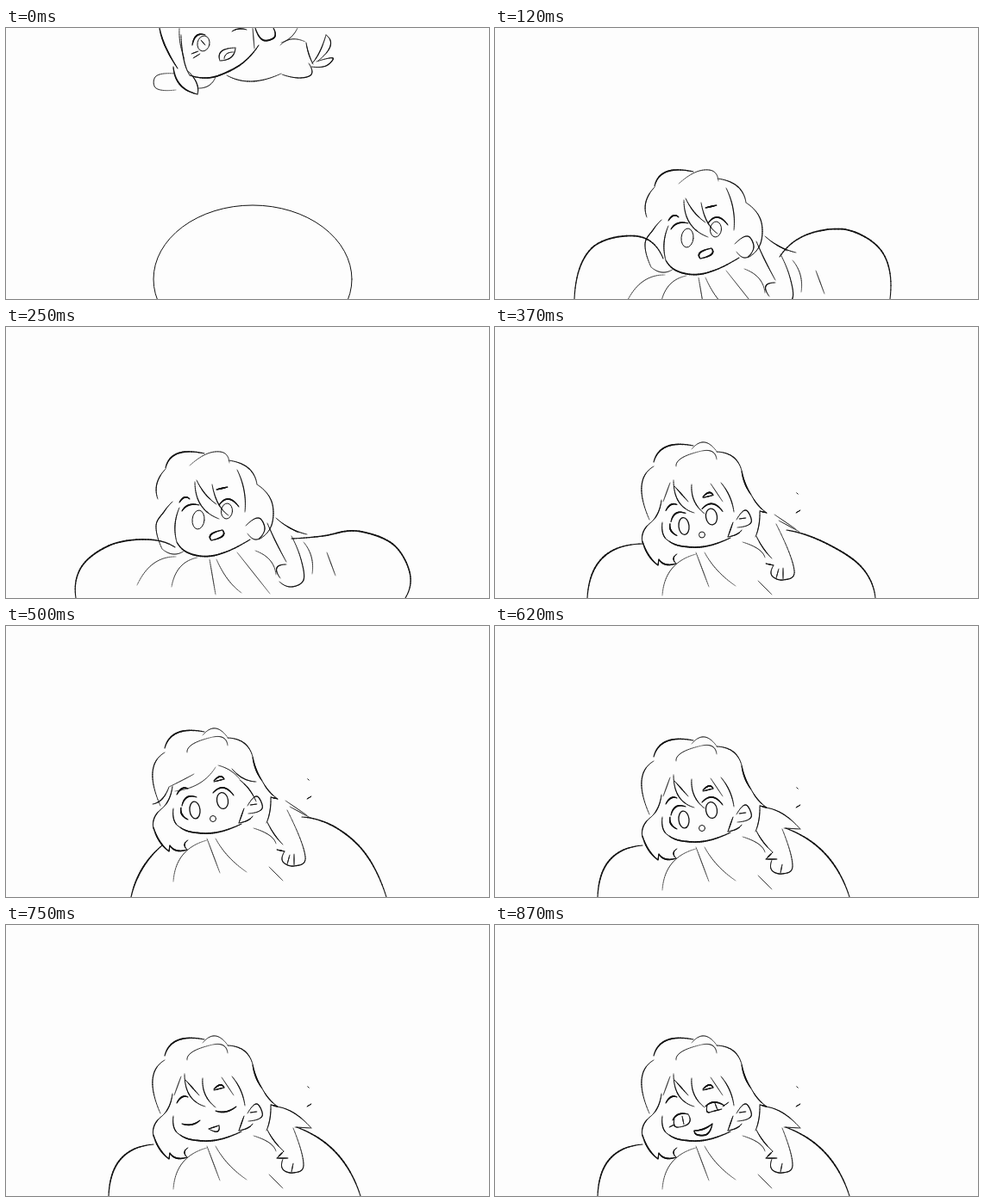
Recreate the animation shown at these times as an HTML page with a canvas. Size 560 px wide and 315 px high, loop 1000 ms.

```html
<!DOCTYPE html>
<html lang="en">
<head>
<meta charset="utf-8">
<title>Bouncy landing</title>
<style>
html, body { margin: 0; width: 100%; height: 100%; overflow: hidden; background: #fdfdfd; }
canvas { display: block; width: 100vw; height: 100vh; }
</style>
</head>
<body>
<canvas id="stage"></canvas>
<script>
const W = 560, H = 315, LOOP = 1000;
const stage = document.getElementById('stage');
const scale = window.devicePixelRatio || 1;
stage.width = W * scale;
stage.height = H * scale;
const ctx = stage.getContext('2d');

const phantom = (a, b, c) => 3 * a - 3 * b + c;

// Smooth tapered stroke through the given points.
function curve(width, p) {
  const pts = [];
  for (let i = 0; i < p.length; i += 2) pts.push({ x: p[i], y: p[i + 1] });
  const n = pts.length - 1;
  const mid = { x: (pts[0].x + pts[n].x) / 2, y: (pts[0].y + pts[n].y) / 2 };
  if (n === 1) return curve(width, [pts[0].x, pts[0].y, mid.x, mid.y, pts[1].x, pts[1].y]);
  const end = (a, b, c) => ({ x: phantom(a.x, b.x, c.x), y: phantom(a.y, b.y, c.y) });
  const all = [end(pts[0], pts[1], pts[2]), ...pts, end(pts[n], pts[n - 1], pts[n - 2])];
  const at = (i, t, k) => {
    const [a, b, c, d] = [0, 1, 2, 3].map(j => all[i + j][k]);
    return b + t / 2 * (c - a + t * (2 * a - 5 * b + 4 * c - d + t * (3 * (b - c) + d - a)));
  };
  const steps = n * 12;
  let x = pts[0].x, y = pts[0].y;
  for (let s = 1; s <= steps; s++) {
    const i = Math.min(n - 1, Math.floor(s / 12)), t = s / 12 - i;
    ctx.lineWidth = width * (.6 + .4 * Math.sin(Math.PI * s / steps));
    ctx.beginPath();
    ctx.moveTo(x, y);
    ctx.lineTo(x = at(i, t, 'x'), y = at(i, t, 'y'));
    ctx.stroke();
  }
}

const thin = (...p) => curve(.75, p);
const mid = (...p) => curve(1.15, p);
const bold = (...p) => curve(1.75, p);

function oval(x, y, rx, ry, tilt = 0, width = 1) {
  ctx.lineWidth = width;
  ctx.beginPath();
  ctx.ellipse(x, y, rx, ry, tilt, 0, 2 * Math.PI);
  ctx.stroke();
}

function shifted(dy, draw) {
  ctx.save();
  ctx.translate(0, dy);
  draw();
  ctx.restore();
}

function falling() {
  bold(178, 0, 185, 22, 199, 47);
  bold(194, 45, 202, 66, 222, 77);
  mid(222, 77, 221, 64, 211, 50);
  mid(203, 8, 206, 36, 213, 55);
  bold(213, 55, 232, 58, 250, 54, 274, 41, 293, 20);
  bold(289, 0, 298, 14, 311, 11, 310, 0);
  thin(196, 53, 174, 56, 174, 70, 197, 72);
  thin(222, 70, 235, 67, 243, 57);
  thin(201, 0, 202, 18, 207, 36);
  oval(229, 18, 7, 9, .2);
  bold(216, 20, 221, 9, 231, 8);
  thin(226, 14, 231, 20);
  thin(215, 30, 223, 27);
  thin(217, 35, 225, 30);
  mid(248, 38, 250, 27, 266, 23);
  mid(266, 23, 261, 34, 248, 38);
  thin(253, 36, 256, 30, 264, 28);
  mid(262, 4, 270, 1, 279, 2);
  thin(286, 0, 288, 24);
  mid(256, 55, 285, 62, 319, 53);
  mid(320, 54, 340, 58, 354, 54, 351, 41);
  mid(348, 17, 351, 30, 356, 42);
  mid(354, 45, 371, 44, 379, 35, 360, 39);
  mid(355, 41, 364, 27, 371, 8);
  mid(371, 8, 376, 21, 362, 38);
  thin(338, 0, 330, 11, 319, 17);
  thin(318, 20, 331, 13, 347, 16);
}

function landedHead() {
  bold(185, 164, 199, 147, 230, 147);
  thin(213, 161, 234, 147, 252, 146, 259, 158);
  mid(258, 155, 281, 164, 291, 183);
  mid(291, 183, 308, 203, 308, 230, 293, 247);
  mid(185, 165, 175, 182, 176, 200);
  mid(193, 203, 183, 215, 174, 231, 181, 258);
  thin(181, 258, 194, 264, 207, 260);
  mid(201, 210, 196, 230, 198, 250);
  bold(198, 250, 215, 264, 244, 265, 283, 247);
  mid(219, 180, 226, 207, 247, 223);
  mid(221, 178, 231, 194, 244, 206);
  mid(239, 183, 246, 205, 258, 219);
  mid(268, 166, 276, 190, 277, 215);
  mid(278, 231, 293, 222, 300, 234, 293, 246);
  thin(280, 240, 289, 247, 298, 242);
  oval(223, 224, 7, 11, .1);
  oval(256, 214, 6.5, 9, .1);
  bold(204, 214, 212, 207, 224, 207);
  bold(247, 207, 258, 200, 270, 209);
  bold(201, 204, 207, 198, 213, 200);
  bold(244, 189, 257, 186);
  bold(238, 248, 238, 241, 251, 236);
  bold(251, 236, 251, 243, 238, 248);
}

function landedBody() {
  thin(152, 300, 171, 275, 197, 267);
  thin(192, 302, 202, 279, 222, 268);
  thin(236, 270, 243, 311);
  thin(244, 270, 257, 293, 273, 309);
  thin(268, 262, 306, 310);
  thin(289, 260, 306, 271, 313, 288);
  thin(345, 250, 354, 267, 355, 287);
  thin(372, 262, 382, 289);
  mid(303, 228, 313, 250, 325, 273);
  mid(325, 276, 314, 280, 318, 292);
  mid(317, 296, 331, 302, 345, 294, 342, 270, 331, 243);
  mid(313, 222, 330, 234, 349, 241);
  thin(326, 232, 339, 239);
}

function landed() {
  landedHead();
  landedBody();
}

function head() {
  bold(184, 152, 199, 134, 230, 133);
  thin(210, 157, 217, 147, 240, 139);
  thin(240, 139, 252, 140, 257, 149);
  thin(228, 137, 243, 129, 258, 141);
  mid(257, 140, 276, 146, 286, 162);
  bold(286, 162, 290, 177, 297, 190);
  mid(297, 190, 305, 202, 315, 211);
  mid(315, 211, 307, 209);
  mid(307, 209, 306, 225, 302, 239);
  mid(184, 157, 170, 180, 179, 219);
  mid(193, 196, 189, 211, 181, 222);
  mid(181, 222, 172, 233, 171, 246);
  bold(171, 244, 178, 260, 189, 272);
  mid(189, 272, 190, 265);
  bold(190, 265, 198, 271, 210, 270);
  mid(210, 270, 207, 264, 211, 259);
  mid(194, 222, 195, 236, 202, 244);
  bold(202, 244, 218, 250, 244, 250, 273, 240);
  mid(280, 219, 291, 208, 297, 222, 281, 228);
  thin(283, 218, 291, 217);
  mid(276, 222, 270, 239);
  mid(270, 239, 280, 236, 286, 231);
}

function bangs() {
  mid(207, 173, 213, 198, 231, 211);
  mid(208, 180, 224, 198);
  mid(228, 178, 231, 197, 243, 212);
  mid(262, 176, 272, 192, 277, 210);
  thin(203, 176, 195, 198);
  thin(250, 177, 264, 198);
}

function sweptBangs() {
  mid(170, 217, 181, 211, 189, 197);
  thin(189, 197, 205, 189, 218, 182);
  thin(196, 202, 224, 193, 243, 174);
  thin(246, 172, 260, 178, 271, 188);
  mid(262, 176, 275, 187, 290, 191);
  mid(271, 189, 282, 200, 290, 214);
}

function brows() {
  bold(198, 207, 204, 200, 211, 200);
  bold(241, 191, 248, 186, 253, 189);
  mid(253, 189, 241, 192);
}

function openFace() {
  oval(219, 225, 6, 10, -.1, 1.3);
  oval(251, 214, 6.5, 9.5, -.15, 1.3);
  oval(240, 235, 3.5, 3.5);
  bold(204, 220, 210, 210, 221, 210);
  bold(240, 205, 252, 199, 264, 208);
  bold(203, 222, 204, 230, 211, 236);
}

function blinkFace() {
  bold(204, 231, 215, 232, 225, 227);
  bold(243, 216, 255, 217, 267, 211);
  mid(235, 237, 247, 233);
  mid(247, 233, 245, 240, 235, 237);
}

function smileFace() {
  bold(206, 227, 213, 220, 224, 220);
  mid(208, 225, 208, 233, 213, 235);
  mid(213, 235, 225, 230, 224, 220);
  thin(217, 222, 219, 232);
  bold(244, 211, 254, 206, 266, 210);
  mid(246, 210, 246, 217, 251, 217);
  mid(251, 217, 263, 214);
  thin(255, 207, 258, 215);
  thin(202, 235, 208, 232);
  thin(264, 211, 271, 206);
  bold(231, 239, 242, 237, 252, 231);
  bold(252, 231, 246, 243, 235, 244, 231, 239);
}

function body() {
  thin(194, 307, 205, 276, 233, 259);
  thin(233, 257, 248, 297);
  thin(243, 257, 258, 278, 279, 296);
  thin(287, 245, 305, 253, 313, 263);
  thin(305, 290, 321, 306);
  thin(350, 188, 351, 189);
  thin(349, 211, 354, 208);
}

function spreadArm() {
  mid(303, 238, 311, 251, 322, 263);
  mid(322, 263, 314, 271);
  mid(314, 271, 327, 271);
  mid(321, 272, 321, 284, 333, 288, 345, 279, 333, 236);
  thin(331, 287, 333, 277);
  mid(312, 211, 333, 218, 354, 236);
  thin(354, 236, 335, 235);
}

function foldedArm() {
  mid(303, 238, 311, 252, 321, 264);
  mid(314, 270, 323, 272);
  mid(323, 272, 321, 284, 334, 289, 347, 278, 326, 224);
  thin(326, 287, 329, 276);
  thin(334, 288, 334, 275);
  thin(324, 213, 349, 230);
  thin(329, 220, 353, 233);
}

const balls = {
  round() { oval(286, 292, 115, 86); },
  dented() {
    bold(92, 315, 112, 256, 165, 242, 195, 268);
    bold(330, 266, 362, 240, 410, 235, 450, 262, 458, 315);
  },
  wide() {
    bold(81, 315, 88, 278, 122, 253, 165, 247, 196, 256);
    bold(331, 246, 367, 243, 406, 237, 448, 252, 468, 285, 463, 315);
  },
  low() {
    bold(107, 315, 125, 268, 172, 252);
    bold(338, 236, 381, 250, 424, 278, 441, 315);
  },
  tall() {
    bold(145, 315, 158, 282, 181, 255);
    bold(343, 222, 382, 234, 417, 265, 441, 315);
  },
  rest() {
    bold(119, 315, 133, 272, 171, 255);
    bold(337, 235, 383, 265, 411, 315);
  }
};

const girl = (hair, arm, face, dy = 0, faceDy = 0) => () => shifted(dy, () => {
  [head, hair, body, arm].forEach(part => part());
  shifted(faceDy, () => { brows(); face(); });
});

const poses = [
  { start: 0, ball: balls.round, figure: falling },
  { start: 120, ball: balls.dented, figure: () => shifted(20, landed) },
  { start: 250, ball: balls.wide, figure: landed },
  { start: 370, ball: balls.low, figure: girl(bangs, foldedArm, openFace, 5, 1.5) },
  { start: 500, ball: balls.tall, figure: girl(sweptBangs, foldedArm, openFace, -10, -1) },
  { start: 620, ball: balls.rest, figure: girl(bangs, spreadArm, openFace) },
  { start: 750, ball: balls.rest, figure: girl(bangs, spreadArm, blinkFace) },
  { start: 870, ball: balls.rest, figure: girl(bangs, spreadArm, smileFace) }
];

let shown;
function render() {
  const t = (performance.now() - began) % LOOP;
  const pose = poses.findLast(p => p.start <= t) || poses[0];
  if (pose !== shown) {
    shown = pose;
    ctx.setTransform(scale, 0, 0, scale, 0, 0);
    ctx.fillStyle = '#fdfdfd';
    ctx.fillRect(0, 0, W, H);
    ctx.strokeStyle = '#111';
    ctx.lineCap = 'round';
    pose.ball();
    pose.figure();
  }
  requestAnimationFrame(render);
}
const began = performance.now();
render();
</script>
</body>
</html>
```
